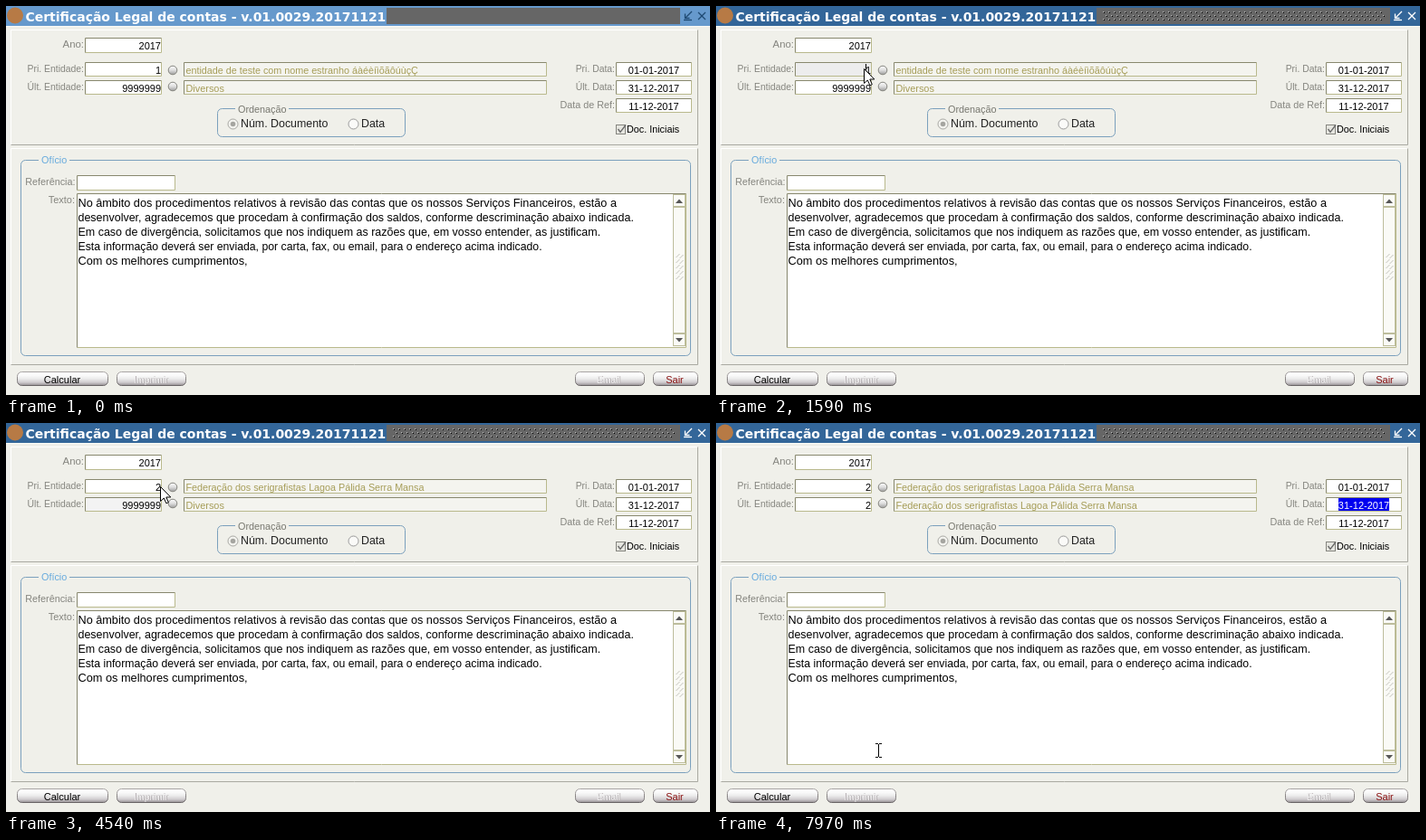
Animation, 777 px wide and 430 px high, one loop 8000 ms. Source, as an HTML page with a canvas:

```html
<!DOCTYPE html>
<html lang="pt">
<head>
<meta charset="utf-8">
<title>Certificação Legal de contas</title>
<style>
html, body { margin: 0; width: 100%; height: 100%; overflow: hidden; background: #f0f0ea; }
canvas, svg { position: absolute; left: 0; top: 0; width: 777px; height: 430px; }
svg { pointer-events: none; user-select: none; }
text { font-family: "Liberation Sans", Arial, sans-serif; white-space: pre; }
.title { font-family: "DejaVu Sans", Verdana, sans-serif; font-weight: bold; }
</style>
</head>
<body>
<canvas id="stage" width="777" height="430"></canvas>
<svg id="layer" viewBox="0 0 777 430">
  <g id="texts"></g>
  <g id="arrow"><path d="M.5 .5V16.5L4.3 13L6.9 18.8L9.3 17.7L6.8 12H11.8Z" fill="#fff" stroke="#000"/></g>
  <g id="beam" shape-rendering="crispEdges"><path d="M-3 -7.5H0M1 -7.5H4M-3 7.5H0M1 7.5H4M.5 -7V7" fill="none" stroke="#000"/></g>
</svg>
<script>
const LOOP = 8000;
const BG = '#f0f0ea', GREY = '#85857f', OLIVE = '#a69d58', BLUE = '#7ba0bd';
const $ = id => document.getElementById(id);
const ctx = $('stage').getContext('2d');

function text(x, y, str, size = 11, fill = '#000', anchor = 'start', cls = '') {
  const el = document.createElementNS('http://www.w3.org/2000/svg', 'text');
  const attrs = { x, y, fill, 'font-size': size, 'text-anchor': anchor, class: cls };
  for (const k in attrs) el.setAttribute(k, attrs[k]);
  el.textContent = str;
  $('texts').append(el);
  return el;
}

// Labels
text(21.5, 17, 'Certificação Legal de contas - v.01.0029.20171121', 13.97, '#fff', 'start', 'title');
const label = (x, y, str, size = 10.8) => text(x, y, str, size, GREY, 'end');
label(86, 46, 'Ano:', 11.4);
label(86, 73, 'Pri. Entidade:', 10.4);
label(86, 93, 'Últ. Entidade:', 10.4);
label(672, 73, 'Pri. Data:', 10.4);
label(672, 93, 'Últ. Data:', 10.4);
label(672, 113, 'Data de Ref:');
label(76.5, 198, 'Referência:');
label(76, 218, 'Texto:', 11);
text(256, 118, 'Ordenação', 10.8, '#77776f');
text(39, 174, 'Ofício', 10.8, '#66aadd');
text(259, 134, 'Núm. Documento', 12.4, '#222');
text(392, 134, 'Data', 12.4, '#222');
text(685, 140, 'Doc. Iniciais', 10.8);
[['No âmbito dos procedimentos relativos à revisão das contas que os nossos Serviços Financeiros, estão a', 12.7],
 ['desenvolver, agradecemos que procedam à confirmação dos saldos, conforme descriminação abaixo indicada.', 12.47],
 ['Em caso de divergência, solicitamos que nos indiquem as razões que, em vosso entender, as justificam.', 12.47],
 ['Esta informação deverá ser enviada, por carta, fax, ou email, para o endereço acima indicado.', 12.25],
 ['Com os melhores cumprimentos,', 12.75]
].forEach(([str, size], i) => text(79.5, 222 + i * 16, str, size));
text(62, 416.5, 'Calcular', 11, '#000', 'middle');
for (const [x, str] of [[160, 'Imprimir'], [665, 'Email']]) {
  text(x + .7, 417, str, 10.4, '#a8a4a6', 'middle');
  text(x, 416.5, str, 10.4, '#f0eeef', 'middle');
}
text(738, 416.5, 'Sair', 11, '#8c1414', 'middle');

// Field values
text(171, 48, '2017', 11, '#000', 'end');
const first = text(171, 75, '1', 11, '#000', 'end');
const last = text(171, 95, '9999999', 11, '#000', 'end');
const firstName = text(198.5, 75, '', 10.75, OLIVE);
const lastName = text(198.5, 95, '', 10.9, OLIVE);
const dates = ['01-01-2017', '31-12-2017', '11-12-2017']
  .map((d, i) => text(715, 75 + i * 20, d, 11, '#000', 'middle'));
const TEST = 'entidade de teste com nome estranho áàéèíìõãôúùçÇ';
const GROUP = 'Federação dos serigrafistas Lagoa Pálida Serra Mansa';

function box(x, y, w, h, fill) {
  ctx.fillStyle = fill;
  ctx.fillRect(x, y, w, h);
}

function line(color, ...pts) {
  ctx.strokeStyle = color;
  ctx.beginPath();
  for (let i = 0; i < pts.length; i += 2) ctx.lineTo(pts[i], pts[i + 1]);
  ctx.stroke();
}

function field(x, y, w, h, fill = '#fff') {
  box(x, y, w, h, fill);
  const r = x + w - .5, b = y + h - .5;
  line('#b9b98c', r, y + .5, r, b, x + .5, b);
  line('#88886e', x + .5, b, x + .5, y + .5, r, y + .5);
}

function panel(y, h) {
  const b = y + h - .5;
  line('#fff', 5.5, b, 5.5, y + .5, 763.5, y + .5);
  line('#a9a9a1', 763.5, y + .5, 763.5, b, 5.5, b);
}

function group(x, y, w, h, gapX, gapW) {
  ctx.strokeStyle = BLUE;
  ctx.beginPath();
  ctx.roundRect(x + .5, y + .5, w, h, 5);
  ctx.stroke();
  box(gapX, y - 1, gapW, 3, BG);
}

function disc(x, y, r, fill, stroke) {
  ctx.beginPath();
  ctx.arc(x, y, r, 0, 7);
  ctx.fillStyle = fill;
  ctx.fill();
  if (stroke) {
    ctx.strokeStyle = stroke;
    ctx.stroke();
  }
}

function shade(y, h, ...colors) {
  const g = ctx.createLinearGradient(0, y, 0, y + h);
  colors.forEach((c, i) => g.addColorStop(i / (colors.length - 1), c));
  return g;
}

function pill(x, w) {
  ctx.beginPath();
  ctx.roundRect(x + .5, 404.5, w - 1, 15, 5);
  ctx.fillStyle = shade(404, 16, '#fff', '#fbfbfb', '#ececec', '#d0cccf', '#8c878a');
  ctx.fill();
  ctx.strokeStyle = shade(404, 16, '#aaa6a6', '#8c8888', '#666163');
  ctx.stroke();
}

function triangle(x, y, dir) {
  ctx.fillStyle = '#555';
  ctx.beginPath();
  ctx.moveTo(x - 4, y - 2 * dir);
  ctx.lineTo(x + 4, y - 2 * dir);
  ctx.lineTo(x, y + 2.5 * dir);
  ctx.fill();
}

function titleBar(active) {
  box(0, 0, 777, 22, active ? '#336699' : '#6699cc');
  box(0, 22, 777, 1, '#fafaf6');
  disc(10, 10.5, 9, '#b77a45');
  box(420, 2, 324, 18, '#666');
  if (active) {
    for (let row = 0; row < 3; row++) {
      for (let x = 427 + row % 2 * 3; x < 738; x += 6) {
        box(x, 6 + row * 4, 1, 1, '#bbb');
        box(x + 1, 7 + row * 4, 1, 1, '#000');
      }
    }
  }
  const ink = active ? '#fff' : '#1f4a73';
  ctx.lineWidth = 1.3;
  line(ink, 757, 6, 750, 13);
  line(ink, 749.5, 8.5, 749.5, 13.5, 754.5, 13.5);
  line(ink, 748, 15.5, 757, 15.5);
  line(ink, 764, 7, 772, 15);
  line(ink, 772, 7, 764, 15);
  ctx.lineWidth = 1;
}

function textArea() {
  field(78, 207, 673, 171);
  box(736, 209, 13, 168, '#fafaf6');
  ctx.strokeStyle = '#bdbd9c';
  ctx.strokeRect(736.5, 208.5, 13, 13);
  ctx.strokeRect(736.5, 222.5, 13, 139);
  ctx.strokeRect(736.5, 362.5, 13, 13);
  triangle(743, 216, -1);
  triangle(743, 369, 1);
  for (let y = 278; y < 308; y += 6) {
    line('#c4c4bc', 739.5, y, 743.5, y - 4);
    line('#c4c4bc', 743.5, y + 1, 747.5, y - 3);
  }
}

function drawForm(t) {
  box(0, 0, 777, 430, BG);
  titleBar(t >= 1590);
  panel(26, 128);
  panel(157, 240);
  group(233, 113, 207, 31, 253, 59);
  group(16, 170, 739, 216, 36, 34);

  field(87, 35, 85, 17);
  field(87, 62, 85, 16, t >= 1590 && t < 3610 ? '#ededed' : '#fff');
  field(87, 82, 85, 16, t >= 4540 && t < 6330 ? '#f3f3f3' : '#fff');
  for (const y of [62, 82]) field(196, y, 401, 16, '#f4f4ef');
  for (const y of [71, 89]) disc(184, y, 4.8, shade(y - 5, 10, '#fff', '#ddd', '#999'), '#85857f');
  for (const y of [62, 82, 102]) field(673, y, 84, 16);
  field(78, 187, 109, 17);

  disc(250.5, 130.5, 5.5, '#f4f4f0', '#a5a5a0');
  disc(250.5, 130.5, 2.8, '#a5a5a0');
  disc(383.5, 130.5, 5.5, '#fafaf8', '#999');

  box(673, 131, 11, 11, '#e6e6e0');
  ctx.strokeStyle = '#85857f';
  ctx.strokeRect(673.5, 131.5, 10, 10);
  ctx.lineWidth = 1.3;
  line('#666', 675.5, 136, 678, 139.5, 684, 131.5);
  ctx.lineWidth = 1;

  textArea();
  pill(12, 101);
  pill(122, 77);
  pill(628, 77);
  pill(714, 50);

  if (t >= 3690 && t < 4540) box(687, 63, 56, 14, '#0000f0');
  if (t >= 6410) box(687, 83, 56, 14, '#0000f0');
  if (t >= 1590 && t < 3150) box(165, 64, 1, 13, '#000');
  if (t >= 5490 && t < 6100) box(170, 84, 1, 12, '#000');
}

function setValues(t) {
  first.textContent = t < 3150 ? '1' : '2';
  last.textContent = t < 5490 ? '9999999' : '2';
  firstName.textContent = t < 3610 ? TEST : GROUP;
  lastName.textContent = t < 6330 ? 'Diversos' : GROUP;
  dates[0].setAttribute('fill', t >= 3690 && t < 4540 ? '#fff' : '#000');
  dates[1].setAttribute('fill', t >= 6410 ? '#fff' : '#000');
}

// time, x, y, number of jumps towards the next stop
const stops = [
  [210, 230, 422, 5], [590, 195, 99, 5], [990, 166, 71, 1], [1220, 167, 71, 1],
  [1300, 167, 72, 1], [1590, 163, 69, 4], [1900, 170, 70, 1], [7020, 172, 84, 4],
  [7340, 201, 338, 1], [7740, 205, 339, 1], [7890, 192, 350, 1], [7970, 179, 362, 1]
];

function pointerAt(t) {
  const i = stops.findLastIndex(s => s[0] <= t);
  if (i < 0) return null;
  const [t0, x0, y0, n] = stops[i];
  const [t1, x1, y1] = stops[i + 1] || [LOOP, x0, y0];
  const k = Math.floor((t - t0) / (t1 - t0) * n) / n;
  const e = k * k * (3 - 2 * k);
  return [Math.round(x0 + (x1 - x0) * e), Math.round(y0 + (y1 - y0) * e)];
}

const editable = [[87, 62, 85, 16], [87, 82, 85, 16], [78, 207, 658, 171], [78, 187, 109, 17]];

function movePointer(t) {
  const p = pointerAt(t);
  const waiting = t >= 1590 && t < 7020;
  const typing = p && !waiting && editable.some(([x, y, w, h]) =>
    p[0] >= x && p[0] <= x + w && p[1] >= y && p[1] <= y + h);
  for (const [id, on] of [['arrow', p && !typing], ['beam', typing]]) {
    $(id).style.display = on ? '' : 'none';
    if (on) $(id).setAttribute('transform', `translate(${p})`);
  }
}

const start = performance.now();
function tick() {
  const t = (performance.now() - start) % LOOP;
  drawForm(t);
  setValues(t);
  movePointer(t);
  requestAnimationFrame(tick);
}
tick();
</script>
</body>
</html>
```
